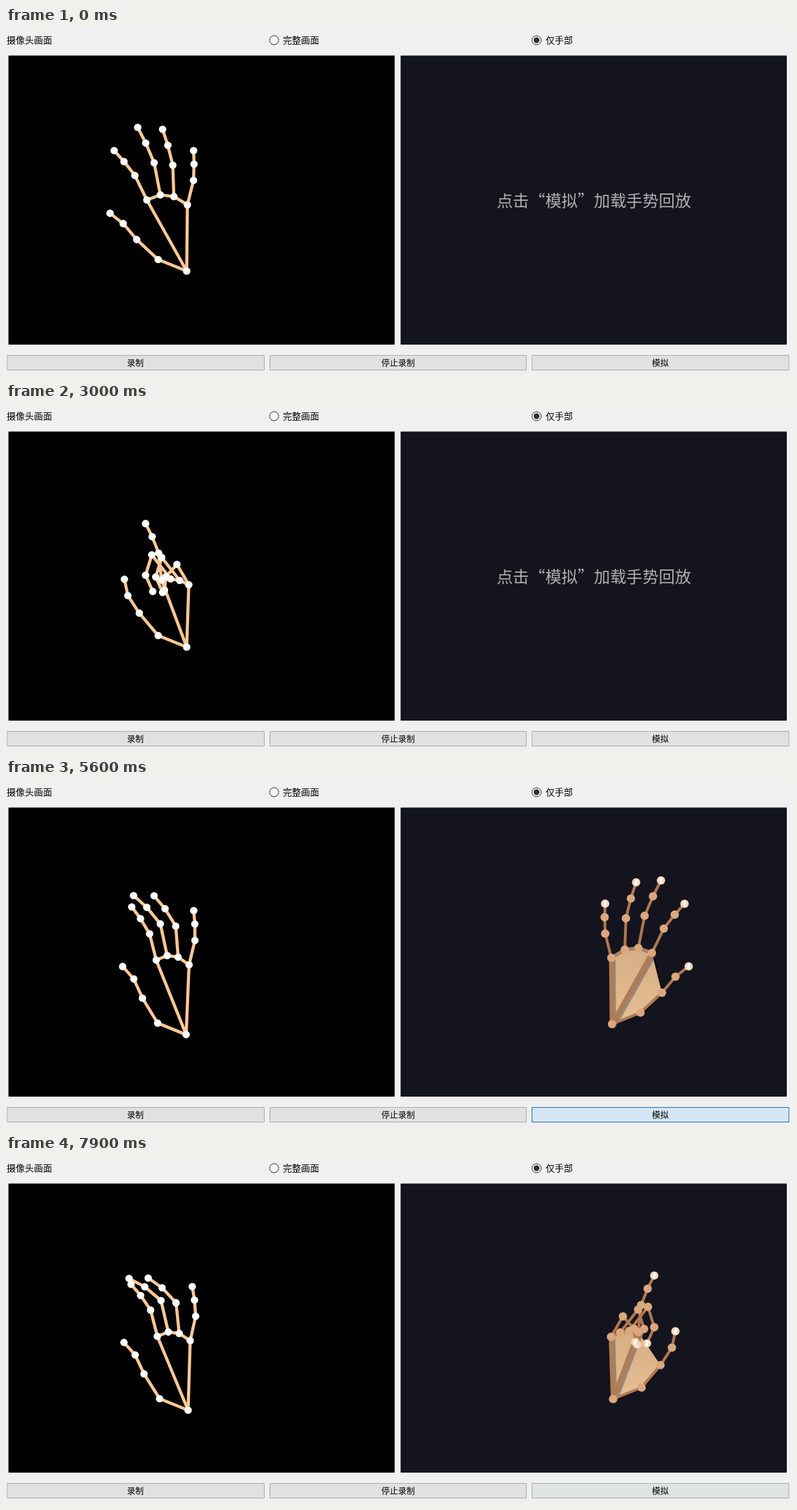
Write an HTML page with a canvas that moves like this. It is 1123 by 499 pixels and loops after 8 s.

```html
<!DOCTYPE html>
<html lang="zh-CN">
<head>
<meta charset="utf-8">
<title>手势录制</title>
<style>
  html, body { margin: 0; width: 100%; height: 100%; overflow: hidden; background: #f0f0f0; }
  svg, canvas { position: absolute; left: 0; top: 0; width: 1123px; height: 499px; display: block; }
  text { font-family: "Noto Sans CJK SC", "Noto Sans CJK", sans-serif; font-size: 13px; fill: #000; }
  .button { fill: #e1e1e1; stroke: #adadad; }
  .button.hot { fill: #d4e6f5; stroke: #2a72a8; }
  .button.warm { fill: #e0e3e2; }
  .caption { font-size: 12px; text-anchor: middle; }
  #hint { font-size: 23.2px; font-weight: 300; fill: #b0b0b0; text-anchor: middle; }
</style>
</head>
<body>
<svg viewBox="0 0 1123 499">
  <text x="1" y="22">摄像头画面</text>
  <circle cx="383.5" cy="17.5" r="6.5" fill="#fff" stroke="#333"/>
  <text x="396" y="22">完整画面</text>
  <circle cx="759" cy="17.5" r="6.5" fill="#fff" stroke="#333"/>
  <circle cx="759" cy="17.5" r="4.2" fill="#333"/>
  <text x="772" y="22">仅手部</text>
  <rect x="3.5" y="39.5" width="552.5" height="414.5" fill="#000"/>
  <rect x="564.5" y="39.5" width="552.5" height="414.5" fill="#14141e"/>
  <text id="hint" x="841" y="256">点击“模拟”加载手势回放</text>
  <rect id="record" class="button" x="2" y="469.5" width="367.5" height="21"/>
  <text class="caption" x="185" y="485">录制</text>
  <rect id="stop" class="button" x="377.5" y="469.5" width="367" height="21"/>
  <text class="caption" x="561" y="485">停止录制</text>
  <rect id="replay" class="button" x="752.5" y="469.5" width="367.5" height="21"/>
  <text class="caption" x="936" y="485">模拟</text>
</svg>
<canvas id="hands" width="1123" height="499"></canvas>
<script>
const LOOP = 8000, STEP = 100, REPLAY_AT = 5500, DELAY = 4900, MIRROR = 1126;
const $ = id => document.getElementById(id);
const ctx = $('hands').getContext('2d');
const mix = (a, b, k) => a + (b - a) * k;

// Wrist x, y; palm width, height and lean; thumb and thumb tip angles;
// tilt of bent fingers; bend of the index finger and of the others, 0 to 1.
const open = { x: 258, y: 348, width: 58, height: 102, lean: 1, thumb: 47, tip: 52, tilt: 20, index: 0, curl: 0 };
const fist = { ...open, y: 345, width: 44, height: 94, lean: -3, thumb: 40, tip: 19, index: 1, curl: 1 };
const point = { ...fist, y: 348, lean: -1, tip: 39, tilt: 29, index: .13 };
const bend = { ...open, y: 365, width: 45, height: 106, lean: 3, thumb: 32, tip: 42, index: .07, curl: .22 };

const track = [
  [0, open],
  [1000, { ...open, x: 260, y: 350 }],
  [1300, { ...fist, width: 49, lean: 5, tip: 39, tilt: 9, index: .85, curl: .85 }],
  [1400, fist],
  [1900, { ...open, y: 356, height: 106 }],
  [2300, point],
  [3000, { ...point, width: 39, height: 96, lean: 3, tip: 12, tilt: 38, index: .03 }],
  [3300, { ...open, x: 263, y: 360, height: 112 }],
  [3700, { ...fist, y: 355, width: 47, height: 97, lean: 7, tip: -9 }],
  [4200, { ...open, x: 260, y: 362, height: 106 }],
  [4800, { ...open, x: 256, y: 364, width: 50, height: 108, lean: 6, thumb: 30, tip: 41 }],
  [6200, bend],
  [7900, { ...bend, x: 260, y: 364, width: 47 }]
];

function poseAt(t) {
  const i = Math.max(1, track.findIndex(([at]) => at >= t));
  const [t0, a] = track[i - 1], [t1, b] = track[i];
  const u = (t - t0) / (t1 - t0), k = u * u * (3 - 2 * u);
  return Object.fromEntries(Object.keys(a).map(key => [key, mix(a[key], b[key], k)]));
}

// Adds one bone after another; angles are degrees leftward from straight up.
function limb(start, lengths, angles) {
  const joints = [start];
  lengths.forEach((length, i) => {
    const [x, y] = joints[i], a = angles[i] * Math.PI / 180;
    joints.push([x - length * Math.sin(a), y - length * Math.cos(a)]);
  });
  return joints;
}

// 21 joints: wrist, then four for each finger from thumb to little finger.
function handPoints(p) {
  const points = limb([p.x, p.y], [44, 42, 30, 24], [68, p.thumb, p.thumb - 7, p.tip]);
  const splay = [26 - 1.1 * (58 - p.width), 11, 2, -14];
  const bends = [p.index, p.curl, p.curl, .85 * p.curl ** 2];
  const drop = 7 - 9 * p.index, arch = 9.5 - 5.5 * p.curl;
  [39, 47, 45, 36].forEach((length, i) => {
    const c = bends[i], middle = i === 1 || i === 2;
    const knuckle = [
      p.x + p.lean - p.width * (1 - i / 3),
      p.y - p.height + drop * i / 3 - (middle ? arch : 0)
    ];
    const a = mix(splay[i], p.tilt, c);
    const lengths = [length * (1 - .07 * c), length * .65, length * .54];
    points.push(...limb(knuckle, lengths, [a, a + 12 + 113 * c, a + 16 + 150 * c]));
  });
  return points;
}

const palmBones = [[5, 0, 17]];
const knuckles = [[5, 9, 13, 17]];
const fingers = [[0, 1, 2, 3, 4], ...[5, 9, 13, 17].map(i => [i, i + 1, i + 2, i + 3])];

function trace(points, chain) {
  ctx.beginPath();
  chain.forEach(i => ctx.lineTo(...points[i]));
}

function strokeChains(points, chains, width, color) {
  ctx.lineWidth = width;
  ctx.strokeStyle = color;
  for (const chain of chains) {
    trace(points, chain);
    ctx.stroke();
  }
}

function dot([x, y], r, color) {
  ctx.beginPath();
  ctx.arc(x, y, r, 0, 2 * Math.PI);
  ctx.fillStyle = color;
  ctx.fill();
}

function drawSkeleton(points) {
  strokeChains(points, [...palmBones, ...knuckles, ...fingers], 4.4, '#ffc896');
  points.forEach(p => dot(p, 5.3, '#fff'));
}

function drawReplay(points) {
  const palm = [0, 1, 2, 5, 9, 13, 17];
  const shifted = points.map(([x, y]) => [x + 3, y + 3]);
  trace(shifted, palm);
  ctx.fillStyle = 'rgba(0,0,0,.4)';
  ctx.fill();
  const shade = ctx.createLinearGradient(0, points[9][1], 0, points[0][1]);
  shade.addColorStop(0, '#d5ad84');
  shade.addColorStop(1, '#e6bf95');
  trace(points, palm);
  ctx.fillStyle = shade;
  ctx.fill();
  strokeChains(shifted, palmBones, 6, 'rgba(70,75,85,.45)');
  strokeChains(points, knuckles, 5, '#a48263');
  strokeChains(points, palmBones, 6.5, '#b07c56');
  strokeChains(points, fingers, 4, '#b07850');
  points.forEach((p, i) => {
    const tip = i && i % 4 === 0;
    dot(p, 6, tip ? '#f5d3b9' : '#dca77e');
    if (!tip) return;
    ctx.beginPath();
    ctx.ellipse(p[0], p[1], 2, 4.5, 0.2, 0, 2 * Math.PI);
    ctx.fillStyle = '#fff';
    ctx.fill();
  });
}

function draw(now) {
  const t = Math.floor(now % LOOP / STEP) * STEP;
  const within = (a, b) => t >= a && t < b;
  $('record').classList.toggle('hot', within(400, 1200));
  $('stop').classList.toggle('hot', within(4300, 5000));
  $('replay').classList.toggle('hot', within(5200, 5900));
  $('replay').classList.toggle('warm', t >= 5900);
  $('hint').style.display = t < REPLAY_AT ? '' : 'none';

  ctx.setTransform(1, 0, 0, 1, 0, 0);
  ctx.clearRect(0, 0, 1123, 499);
  ctx.translate(.5, .5);
  ctx.lineCap = ctx.lineJoin = 'round';
  drawSkeleton(handPoints(poseAt(t)));
  if (t >= REPLAY_AT) {
    const replayed = handPoints(poseAt(t - DELAY));
    drawReplay(replayed.map(([x, y]) => [MIRROR - x, y]));
  }
}

const start = performance.now();
function tick() {
  draw(performance.now() - start);
  requestAnimationFrame(tick);
}
tick();
</script>
</body>
</html>
```
